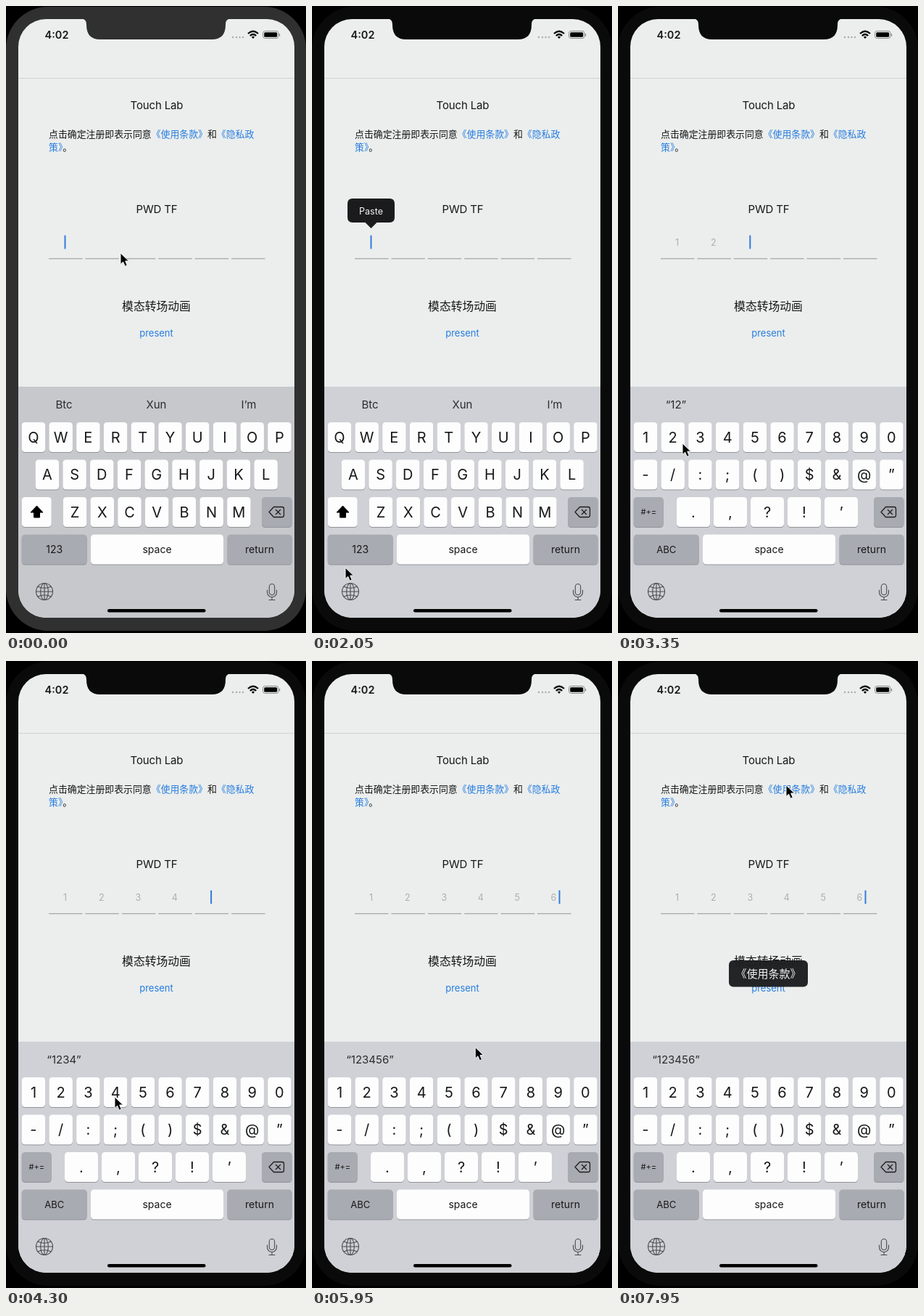
An HTML page that plays this animation: 414 by 863 pixels, repeating every 8000 ms.

```html
<!DOCTYPE html>
<html lang="zh">
<head>
<meta charset="utf-8">
<title>Phone keyboard</title>
<style>
  html, body { margin: 0; width: 100%; height: 100%; overflow: hidden; background: #000; }
  svg { display: block; width: 100vw; height: 100vh; }
  text { font-family: Inter, "Noto Sans CJK SC", "Noto Sans CJK", sans-serif; font-size: 15px; fill: #161718; text-anchor: middle; }
  .cn { font-family: "Noto Sans CJK SC", "Noto Sans CJK", sans-serif; }
  .left { text-anchor: start; }
  .link { fill: #267ce0; }
  .line { fill: none; stroke: #494b50; stroke-width: 1.1; stroke-linecap: round; }
</style>
</head>
<body>
<svg id="stage" viewBox="0 0 414 863" xmlns="http://www.w3.org/2000/svg">
  <defs>
    <clipPath id="screen"><rect x="17" y="18" width="381" height="824" rx="38"/></clipPath>
  </defs>
  <rect id="bezel" y="1" width="414" height="859" rx="58"/>
  <g clip-path="url(#screen)">
    <rect x="17" y="18" width="381" height="824" fill="#ebeeed"/>
    <path d="M17 99.5H398" stroke="#cfd2d1"/>
    <rect id="board" x="17" y="524" width="381" height="318"/>
  </g>
  <path id="notch" d="M103 17C109 18 111 20 111 26C111 39 117 46 130 46H284C297 46 303 39 303 26C303 20 305 18 311 17Z"/>

  <text x="70" y="45" font-weight="600" style="font-size:14.5px">4:02</text>
  <g fill="#a9abac">
    <circle cx="313" cy="43" r="1.2"/><circle cx="318" cy="43" r="1.2"/>
    <circle cx="322.500" cy="43" r="1.2"/><circle cx="327" cy="43" r="1.2"/>
  </g>
  <g fill="none" stroke="#000" stroke-width="2.2">
    <path d="M334 38Q341 31.500 348 38M336.800 41Q341 37 345.200 41"/>
    <path d="M341 45L338.900 42.700Q341 41 343.100 42.700Z" fill="#000" stroke="none"/>
  </g>
  <rect x="354.500" y="34.500" width="21.500" height="10" rx="3" fill="none" stroke="#8b8d8d"/>
  <rect x="356.200" y="36.200" width="18" height="6.600" rx="1.500"/>
  <path d="M377.500 38v3.500" stroke="#8b8d8d" stroke-width="1.300"/>

  <text x="208" y="142" letter-spacing="-.15">Touch Lab</text>
  <text class="cn left" x="59" y="181" style="font-size:12.88px">点击确定注册即表示同意<tspan class="link">《使用条款》</tspan>和<tspan class="link">《隐私政</tspan></text>
  <text class="cn left" x="59" y="199" style="font-size:12.88px"><tspan class="link">策》</tspan>。</text>
  <text x="208" y="285" letter-spacing="-.15">PWD TF</text>
  <g id="field"></g>
  <rect id="caret" y="315.500" width="2" height="19" rx="1" fill="#3479db"/>
  <text class="cn" x="207.500" y="418.500" style="font-size:15.8px">模态转场动画</text>
  <text class="link" x="207.500" y="455" style="font-size:13px">present</text>

  <g id="paste">
    <path d="M56 265H107Q114 265 114 272V291Q114 298 107 298H89.500L81.500 306L73.500 298H56Q49 298 49 291V272Q49 265 56 265Z" fill="#1b1b1d"/>
    <text x="81.500" y="286.500" style="font-size:12.5px;fill:#f4f4f4">Paste</text>
  </g>

  <g id="hints"></g>
  <g id="letters"></g>
  <g id="symbols"></g>
  <g id="shared"></g>

  <g class="line">
    <circle cx="53" cy="806" r="11.500"/><ellipse cx="53" cy="806" rx="5.300" ry="11.500"/>
    <path d="M53 794.500v23M41.500 806h23M44 799q9 4.500 18 0M44 813q9-4.500 18 0"/>
    <rect x="363.300" y="795.500" width="7.400" height="15" rx="3.700"/>
    <path d="M360.500 804v3a6.500 6.500 0 0 0 13 0v-3M367 813.500v4M363 817.500h8"/>
  </g>
  <rect x="140" y="830" width="135.500" height="4.500" rx="2.250"/>

  <g id="toast">
    <rect x="153" y="412" width="109" height="36.500" rx="6" fill="#1c1e20" fill-opacity=".97"/>
    <text class="cn" x="207.500" y="436" style="fill:#f5f5f5">《使用条款》</text>
  </g>
  <path id="pointer" d="M0 0V15.500L3.600 12.200L6.200 18.200L9.200 16.900L6.700 11H11.500Z" stroke="#f6f6f6" stroke-width="1" stroke-linejoin="round"/>
</svg>
<script>
const LOOP = 8000;
const NS = "http://www.w3.org/2000/svg";
const $ = id => document.getElementById(id);

function add(parent, tag, attrs, text = "") {
  const el = document.createElementNS(NS, tag);
  for (const name in attrs) el.setAttribute(name, attrs[name]);
  el.textContent = text;
  parent.append(el);
  return el;
}

function label(parent, x, y, text, size, fill = "#161718") {
  return add(parent, "text", { x, y, style: `font-size:${size}px;fill:${fill}` }, text);
}

function key(parent, x, y, width, text = "", size = 20, fill = "#fdfdfd") {
  const box = { x, width, height: 41, rx: 4.5 };
  add(parent, "rect", { ...box, y: y + 1, fill: "#929499" });
  add(parent, "rect", { ...box, y, fill });
  label(parent, x + width / 2, y + 20.5 + size * 0.36, text, size);
}

function row(parent, chars, x, y, width = 32.5, pitch = 37.72) {
  [...chars].forEach((char, i) => key(parent, x + i * pitch, y, width, char));
}

const GREY = "#a8abb1";
const [letters, symbols, shared] = ["letters", "symbols", "shared"].map($);

row(letters, "QWERTYUIOP", 21.7, 573);
row(letters, "ASDFGHJKL", 40.6, 624.5);
row(letters, "ZXCVBNM", 78.8, 676);
key(letters, 21.7, 676, 41);
add(letters, "path", { d: "M42.500 688L51 697H46.500V704H38.500V697H34Z", stroke: "#000", "stroke-linejoin": "round" });
key(letters, 21.7, 727.5, 90, "123", 14, GREY);

row(symbols, "1234567890", 21.7, 573);
row(symbols, "-/:;()$&@”", 21.7, 624.5);
row(symbols, ".,?!’", 81, 676, 46, 51);
key(symbols, 21.7, 676, 41, "#+=", 11, GREY);
key(symbols, 21.7, 727.5, 90, "ABC", 13, GREY);

key(shared, 117, 727.5, 183, "space", 14);
key(shared, 305.5, 727.5, 89, "return", 14, GREY);
key(shared, 353, 676, 41.500, "", 14, GREY);
add(shared, "path", {
  d: "M363 696.500L369.500 689.500H381Q383.500 689.500 383.500 692V701Q383.500 703.500 381 703.500H369.500ZM372 693l7 7M379 693l-7 7",
  fill: "none", stroke: "#1d1e20", "stroke-width": 1.3, "stroke-linejoin": "round"
});

const slotX = i => 81.5 + i * 50.4;
const digits = [..."123456"].map((digit, i) => {
  const x = 59 + i * 50.4;
  add($("field"), "path", { d: `M${x} 347.800h46.500`, stroke: "#939595" });
  return label($("field"), slotX(i), 330, digit, 12.5, "#adafaf");
});
const hints = ["Btc", "Xun", "I’m"].map((word, i) => label($("hints"), 80 + i * 127.5, 554, word, 15, "#2b2c2e"));

const SWITCH = 2350;
const TYPED = [2950, 3250, 3800, 4300, 4850, 5400];
// time, x, y of the pointer
const PATH = [
  [0, 158, 340], [100, 158, 340], [700, 86, 330], [1250, 86, 330],
  [1950, 46, 773], [2080, 46, 773], [2300, 60, 752], [2450, 60, 752],
  [2850, 38, 602], [3020, 38, 602], [3220, 89, 602], [3450, 89, 602],
  [3700, 115, 601], [3920, 115, 601], [4200, 150, 600], [4420, 150, 600],
  [4750, 180, 599], [5100, 180, 599], [5330, 224, 599], [5700, 224, 599],
  [6700, 232, 171], [LOOP, 232, 171]
];

const ramp = (t, from, to) => Math.min(1, Math.max(0, (t - from) / (to - from)));
const ease = p => p * p * (3 - 2 * p);

function pointerAt(t) {
  const next = Math.max(1, PATH.findIndex(point => point[0] > t));
  const [t0, x0, y0] = PATH[next - 1];
  const [t1, x1, y1] = PATH[next];
  const p = ease(ramp(t, t0, t1));
  return [x0 + (x1 - x0) * p, y0 + (y1 - y0) * p];
}

function blink(elapsed) {
  const phase = elapsed % 1000;
  return 1 - ramp(phase, 550, 650) + ramp(phase, 880, 980);
}

function show(el, visible) {
  el.style.display = visible ? "" : "none";
}

function draw(t) {
  const count = TYPED.filter(time => time <= t).length;
  const opening = t < 50;
  const frameColor = opening ? "#303030" : "#0a0a0a";
  $("bezel").setAttribute("fill", frameColor);
  $("notch").setAttribute("fill", frameColor);
  $("board").setAttribute("fill", opening ? "#c7c8cc" : "#cfd1d6");

  show(letters, t < SWITCH);
  show(symbols, t >= SWITCH);
  digits.forEach((digit, i) => show(digit, i < count));
  hints[0].textContent = count ? `“${"123456".slice(0, count)}”` : "Btc";
  hints.slice(1).forEach(hint => show(hint, !count));

  $("caret").setAttribute("x", (count < 6 ? slotX(count) : 341.5) - 1);
  $("caret").setAttribute("opacity", blink(t - (count ? TYPED[count - 1] : 0)));
  $("paste").setAttribute("opacity", ramp(t, 900, 1170) * (1 - ramp(t, 2800, 2950)));
  $("toast").setAttribute("opacity", ramp(t, 7350, 7550));
  $("pointer").setAttribute("transform", `translate(${pointerAt(t)})`);
}

const start = performance.now();
function tick() {
  draw((performance.now() - start) % LOOP);
  requestAnimationFrame(tick);
}
draw(0);
requestAnimationFrame(tick);
</script>
</body>
</html>
```
